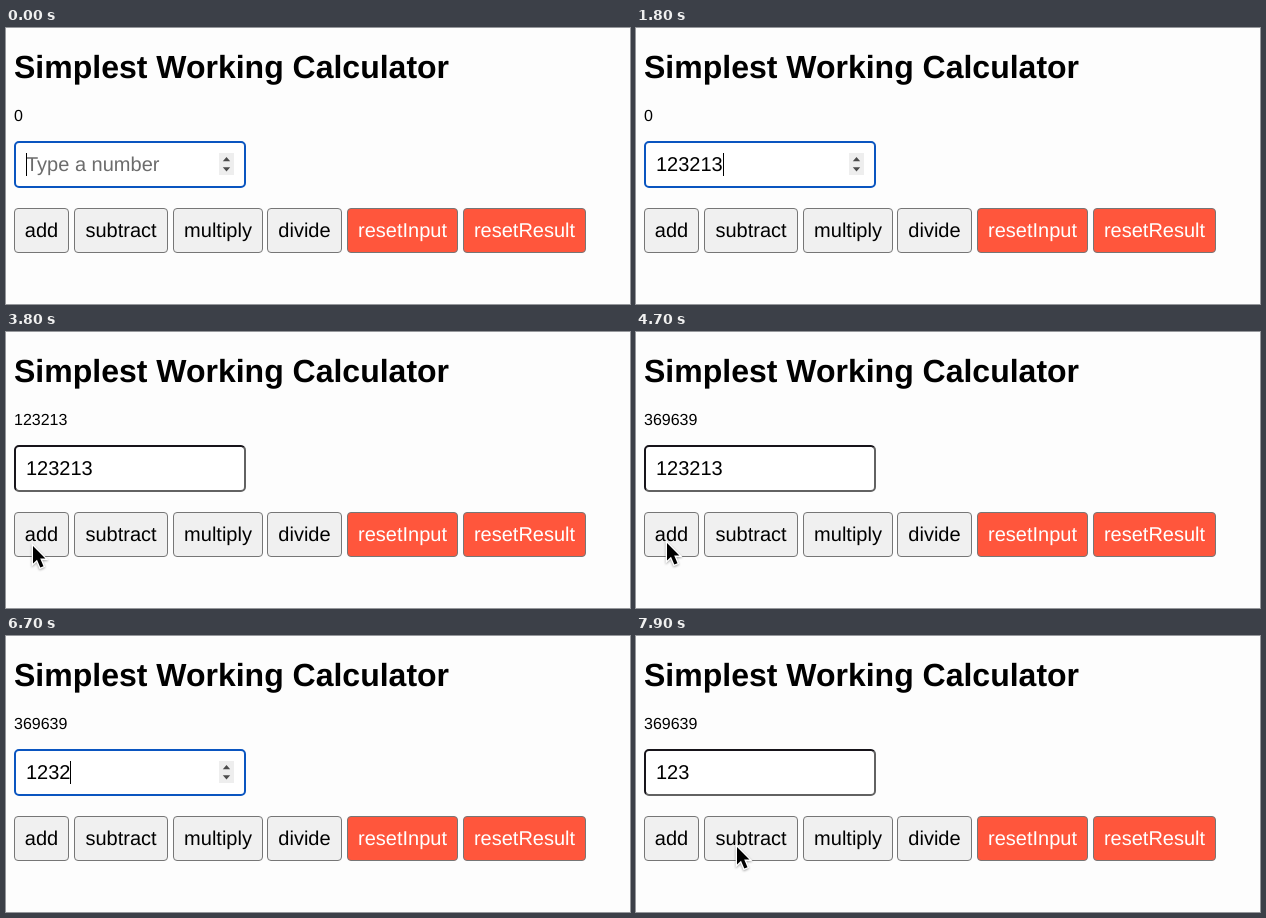
An HTML page that plays this animation: 624x276 px, repeating every 8 s.

```html
<!DOCTYPE html>
<html lang="en">
<head>
<meta charset="utf-8">
<title>Simplest Working Calculator</title>
<style>
  html, body { margin: 0; width: 100%; height: 100%; overflow: hidden; background: #fdfdfd; }
  svg { display: block; width: 624px; height: 276px; }
  text { font: 20px "Liberation Sans", Arial, sans-serif; fill: #000; text-rendering: geometricPrecision; }
  #title { font-size: 32px; font-weight: bold; }
  #result { font-size: 16px; }
  .button rect { fill: #f0f0f0; stroke: #767676; }
  .button text { text-anchor: middle; }
  .reset rect { fill: #ff563c; }
  .reset text { fill: #fff; }
  .frame { fill: none; stroke-width: 2; }
  #field.empty { fill: #6c6c6c; }
  #arrow { filter: drop-shadow(0 1px 1px rgba(0, 0, 0, .35)); }
</style>
</head>
<body>
<svg viewBox="0 0 624 276">
  <text id="title" x="8" y="50">Simplest Working Calculator</text>
  <text id="result" x="8" y="93">0</text>

  <rect x="8" y="113" width="232" height="47" rx="5" fill="#fff"/>
  <g id="idle" class="frame">
    <path d="M237.8 115.2A4 4 0 0 1 239 118V155A4 4 0 0 1 235 159H13A4 4 0 0 1 10.2 157.8" stroke="#626262"/>
    <path d="M10.2 157.8A4 4 0 0 1 9 155V118A4 4 0 0 1 13 114H235A4 4 0 0 1 237.8 115.2" stroke="#17141a"/>
  </g>
  <rect id="focus" class="frame" x="9" y="114" width="230" height="45" rx="4" stroke="#0a55c0"/>
  <text id="field" x="20" y="143"></text>
  <rect id="caret" y="125" width="1" height="23"/>
  <g id="spinner">
    <rect x="213" y="125" width="15" height="22" fill="#eee"/>
    <path d="M216.8 133.2H224.2L220.5 129ZM216.8 139.2H224.2L220.5 143.4Z" fill="#4c4c4c"/>
  </g>

  <g id="buttons"></g>

  <path id="beam" d="M-3 0Q0 0 0 2Q0 0 3 0M0 2V16M-3 18Q0 18 0 16Q0 18 3 18" fill="none" stroke="#222" stroke-width="1.2"/>
  <path id="arrow" d="M0 0V17.5L4 13.8L7.3 21.6L10.5 20.2L7.2 12.6H12.4Z" stroke="#fff" stroke-width="2.6" paint-order="stroke"/>
</svg>
<script>
const LOOP = 8000;
const $ = id => document.getElementById(id);

const buttons = [
  ['add', 8, 55], ['subtract', 68, 94], ['multiply', 167, 90],
  ['divide', 261, 75], ['resetInput', 341, 111], ['resetResult', 457, 123]
];
$('buttons').innerHTML = buttons.map(([label, x, w]) => `
  <g class="button ${label.startsWith('reset') ? 'reset' : ''}">
    <rect x="${x + .5}" y="180.5" width="${w - 1}" height="44" rx="3.5"/>
    <text x="${x + w / 2}" y="209">${label}</text>
  </g>`).join('');

// Each track lists [start time, value...]; a value holds until the next one.
const results = [[0, '0'], [2600, '123213'], [4200, '246426'], [4700, '369639']];
const focus = [[0, true], [2500, false], [5700, true], [7800, false]];
const hover = [[0, false], [5100, true], [5700, false]];
const caret = [[0, true], [200, false], [700, true], [2100, false], [5700, true], [7200, false]];
const number = '123213';
const lengths = [
  [0, 0], ...[...number].map((_, i) => [900 + i * 100, i + 1]),
  [6300, 5], [6600, 4], [6900, 3]
];
const pointer = [
  [0, ''],
  [2200, 'arrow', 62, 217], [2400, 'arrow', 53, 213], [2500, 'arrow', 46, 211], [2700, 'arrow', 44, 210],
  [3100, 'arrow', 45, 206], [3200, 'arrow', 47, 197], [3300, 'arrow', 48, 184], [3400, 'arrow', 46, 173],
  [3500, 'arrow', 42, 180], [3600, 'arrow', 35, 195], [3700, 'arrow', 29, 208], [3800, 'arrow', 27, 214],
  [3900, 'arrow', 31, 213], [4000, 'arrow', 31, 211],
  [5000, 'arrow', 62, 168], [5100, 'arrow', 99, 139], [5400, 'beam', 95, 139], [5500, 'beam', 94, 139],
  [6000, ''],
  [7500, 'arrow', 95, 148], [7600, 'arrow', 99, 174], [7700, 'arrow', 102, 201], [7800, 'arrow', 101, 211]
];

const at = (track, t) => track.findLast(([start]) => start <= t).slice(1);
const show = (id, on) => $(id).setAttribute('visibility', on ? 'visible' : 'hidden');

function render(t) {
  const [focused] = at(focus, t);
  const [length] = at(lengths, t);
  const [shape, x, y] = at(pointer, t);

  $('result').textContent = at(results, t)[0];
  $('field').textContent = length ? number.slice(0, length) : 'Type a number';
  $('field').classList.toggle('empty', !length);
  $('caret').setAttribute('x', Math.round(20 + length * 11.12));
  show('caret', focused && at(caret, t)[0]);
  show('focus', focused);
  show('idle', !focused);
  show('spinner', focused || at(hover, t)[0]);
  for (const id of ['arrow', 'beam']) show(id, id === shape);
  if (shape) $(shape).setAttribute('transform', `translate(${x} ${y})`);
}

const start = performance.now();
function tick() {
  render((performance.now() - start) % LOOP);
  requestAnimationFrame(tick);
}
tick();
</script>
</body>
</html>
```
